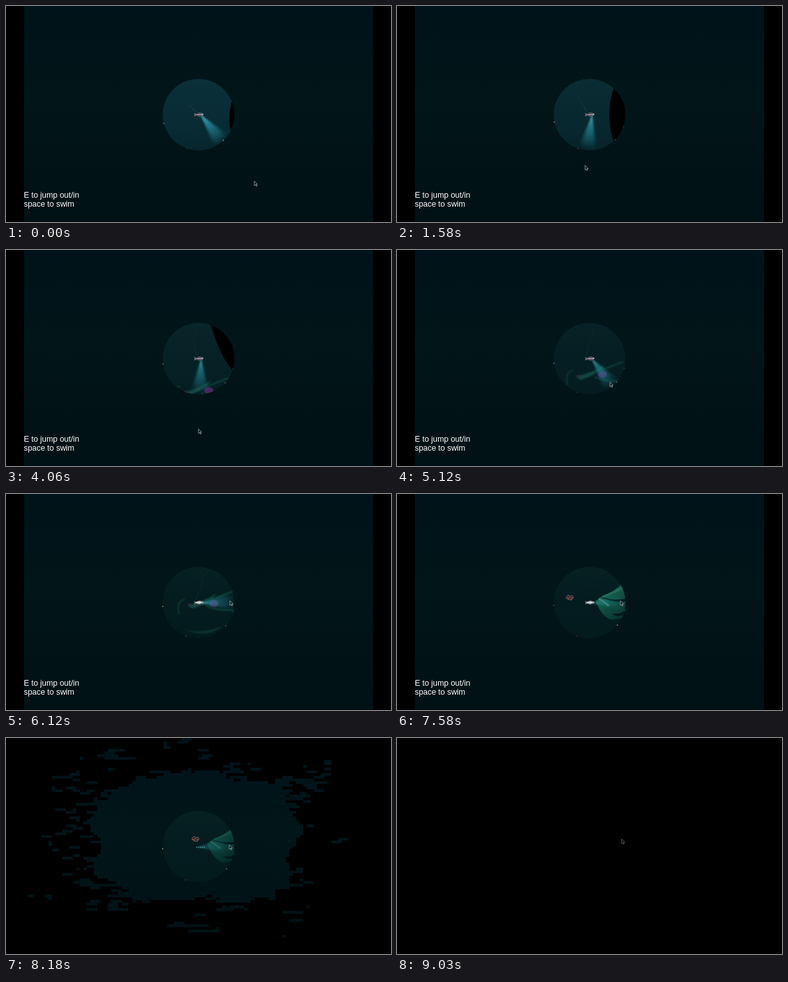
Write an HTML page that moves like this. It is 600 px wide and 338 px high and loops after 9060 ms.

```html
<!DOCTYPE html>
<html lang="en">
<head>
<meta charset="utf-8">
<title>Deep dive</title>
<style>
  html, body { margin: 0; width: 100%; height: 100%; overflow: hidden; background: #000; }
  svg { display: block; width: 100vw; height: 100vh; }
  text { font: 12.45px "Liberation Sans", Arial, sans-serif; fill: #fff; }
</style>
</head>
<body>
<svg viewBox="0 0 600 338">
  <defs>
    <linearGradient id="sea" x2="0" y2="1">
      <stop stop-color="#00131a"/>
      <stop offset=".45" stop-color="#021518"/>
      <stop offset="1" stop-color="#001115"/>
    </linearGradient>
    <linearGradient id="depth" x2="0" y2="1">
      <stop stop-color="#2a6a60" stop-opacity=".07"/>
      <stop offset=".5" stop-color="#06282a" stop-opacity=".05"/>
      <stop offset="1" stop-color="#021518" stop-opacity=".3"/>
    </linearGradient>
    <radialGradient id="light" gradientUnits="userSpaceOnUse" cx="0" cy="0" r="54">
      <stop stop-color="#5fd0dc"/>
      <stop offset=".3" stop-color="#2b9cac" stop-opacity=".85"/>
      <stop offset=".7" stop-color="#217f8d" stop-opacity=".5"/>
      <stop offset="1" stop-color="#1a6873" stop-opacity="0"/>
    </radialGradient>
    <linearGradient id="skin" x2=".7" y2="1">
      <stop stop-color="#1b6b5c"/>
      <stop offset=".5" stop-color="#125546"/>
      <stop offset="1" stop-color="#07332d"/>
    </linearGradient>
    <filter id="soft" x="-20%" y="-50%" width="140%" height="200%"><feGaussianBlur stdDeviation="1"/></filter>
    <clipPath id="lens"><circle cx="300" cy="170" r="56"/></clipPath>
  </defs>

  <rect width="600" height="338"/>
  <rect x="28" width="544" height="338" fill="url(#sea)"/>

  <g clip-path="url(#lens)">
    <circle id="water" cx="300" cy="170" r="56"/>
    <circle cx="300" cy="170" r="56" fill="url(#depth)"/>
    <circle id="wall"/>
    <g id="seabed">
      <g filter="url(#soft)">
        <path d="M274 223Q302 217 320 204Q310 220 282 228Z" fill="#17584d" opacity=".7"/>
        <path d="M262 237Q256 217 271 213" fill="none" stroke="#0a302c" stroke-width="3"/>
        <path d="M264 258Q292 270 330 255Q304 278 264 258" fill="#0a302c"/>
        <path d="M304 217Q328 208 348 200M304 224Q324 232 348 230" fill="none" stroke="#0d3a34" stroke-width="3"/>
      </g>
      <ellipse cx="316" cy="220" rx="7" ry="5.5" fill="#562a6c" opacity=".85"/>
      <ellipse cx="279" cy="222" rx="4" ry="2" fill="#35233e" opacity=".7"/>
    </g>
    <g id="beast">
      <path d="M309 168L319 160Q338 153 350 141L360 146V190Q350 195 334 197Q323 193 316 181Z" fill="url(#skin)"/>
      <path d="M320 161Q339 155 353 145" fill="none" stroke="#2e7d68" stroke-width="3" opacity=".6"/>
      <path d="M317 161Q338 167 358 164V168Q336 171 317 161M335 187Q345 189 354 183L353 189Q342 194 335 187" fill="#021719"/>
      <path d="M315 164Q326 171 330 175" fill="none" stroke="#9ad8cb" stroke-width="3" stroke-dasharray="1 1" opacity=".65"/>
    </g>
    <g id="beam" filter="url(#soft)" fill="url(#light)">
      <path d="M0-.5L53-16Q58 0 53 16L0 .5Z" opacity=".55"/>
      <path d="M0-.5L54-10Q57 0 54 10L0 .5Z" opacity=".6"/>
    </g>
    <g id="bubbles" fill="#3c7480"></g>
    <g id="sub">
      <path d="M293 167l3 2q4-3 9-1.500l3 2-3 2.500q-5 1.500-9-.5l-3 1.500 1-3z" fill="#77747f"/>
      <path d="M297 168.500h7M296 171.500h8" stroke="#312f3d" stroke-width=".8"/>
      <path d="M298 170h6" stroke="#c2aeb5" stroke-width=".8"/>
      <circle cx="306.500" cy="169.500" r="1" fill="#c9dde6"/>
      <path id="glint" d="M295 169l7-1.500 4 2-4 2.500-6-1z" fill="#e4f0f1"/>
    </g>
    <path id="wreck" d="M296 171h14" stroke="#5fa3ad" stroke-width="1.500" stroke-dasharray="2 1"/>
    <g id="hunter" fill="none" stroke-width=".9">
      <path d="M-5.500-1L-2-4 1-2 4-3 6 0 3 4-2 3-4 2Z" fill="#2c2526" stroke="#756a6a"/>
      <path d="M-5 0l3 1 2-2 2 2 3-1M-2 3l1-2M3 3l-1-2" stroke="#985656"/>
    </g>
  </g>
  <g id="markers"></g>

  <text x="27.700" y="300">E to jump out/in</text>
  <text x="27.700" y="314">space to swim</text>

  <path id="dissolve"/>
  <path id="cursor" d="M0 0V7L1.700 5.500 2.900 8.100 4 7.600 2.900 5.100H5Z" fill="#0a0f12" stroke="#b9c0c3" stroke-width=".7"/>
</svg>
<script>
const LOOP = 9060;
const LENS = { x: 300, y: 170, r: 56 };
const DISSOLVE = { start: 7600, end: 8600, reach: 2.4 };
const CELL = { cols: 100, rows: 80, w: 5.44, h: 4.225 };

const $ = id => document.getElementById(id);
const set = (id, attrs) => { for (const k in attrs) $(id).setAttribute(k, attrs[k]); };
const shift = (x, y) => `translate(${x} ${y})`;
const ramp = (t, from, to) => Math.max(0, Math.min(1, (t - from) / (to - from)));
const smooth = k => k * k * (3 - 2 * k);
const mix = (a, b, k) => a + (b - a) * k;
const hash = (a, b) => {
  const s = Math.sin(a * 127.1 + b * 311.7) * 43758.5453;
  return s - Math.floor(s);
};

function circles(parent, count, r) {
  return Array.from({ length: count }, () => {
    const el = document.createElementNS("http://www.w3.org/2000/svg", "circle");
    el.setAttribute("r", r);
    return $(parent).appendChild(el);
  });
}
const bubbles = circles("bubbles", 22, .5);
const markers = circles("markers", 4, .9);
const markerLooks = [[166, "#a9c48a"], [46, "#d8b0a0"], [22, "#244f78"], [108, "#8c2f48"]];

// Stops of the pointer: time, x, y.
const stops = [
  [0, 387, 274], [950, 405, 242], [1500, 293, 249], [2700, 300, 280],
  [4100, 300, 280], [5800, 349, 167], [8200, 348, 167], [LOOP, 350, 158]
];
function pointer(t) {
  const next = stops.findIndex(stop => stop[0] > t);
  const [t0, x0, y0] = stops[next - 1], [t1, x1, y1] = stops[next];
  const k = smooth(ramp(t, t0, t1));
  return [mix(x0, x1, k), mix(y0, y1, k)];
}

function drawBubbles(t) {
  const dx = mix(-24, 20, ramp(t, 2500, 6100)), dy = mix(-20, -52, ramp(t, 0, 4000));
  const visible = 1 - ramp(t, 6000, 7000);
  bubbles.forEach((el, i) => {
    const age = (t / 1700 + i / bubbles.length) % 1;
    el.setAttribute("cx", 296 + (dx + hash(i, 4) * 14 - 7) * age);
    el.setAttribute("cy", 165 + dy * age);
    el.setAttribute("opacity", (.6 - .4 * age) * visible);
  });
}

// Markers slide round the rim towards the horizontal as the dive goes on.
function drawMarkers(t) {
  markers.forEach((el, i) => {
    const [bearing, color] = markerLooks[i];
    const start = bearing * Math.PI / 180;
    const angle = start - .19 * Math.cos(start) * t / 8180;
    el.setAttribute("cx", LENS.x + LENS.r * Math.cos(angle));
    el.setAttribute("cy", LENS.y + LENS.r * Math.sin(angle));
    el.setAttribute("fill", color);
    el.setAttribute("opacity", .7 + .25 * Math.sin(t / 180 + i * 2));
  });
}

// Black cells close in from the edges and leave wide, clustered islands behind.
function isBlack(i, j, radius) {
  const x = Math.abs(28 + (i + .5) * CELL.w - 294) / 153;
  const y = Math.abs((j + .5) * CELL.h - 155) / 96;
  const dist = Math.hypot(x ** 1.5, y ** 1.5) ** (1 / 1.5);
  const piece = hash(Math.floor(i / 3 + hash(j, 9)), j);
  const cluster = hash(i >> 3, (j >> 2) + 40);
  const island = Math.max(0, (piece + cluster) / 2 - .62) * 2;
  const ragged = .06 * Math.sin(i / 5 + j / 3) + .05 * hash(i >> 1, j >> 1);
  return dist > radius * (1 + island + ragged);
}

function dissolvePath(t) {
  const { start, end, reach } = DISSOLVE;
  if (t < start) return "";
  if (t >= end) return "M0 0H600V338H0Z";
  const radius = reach * (1 - ramp(t, start, end));
  let d = "";
  for (let j = 0; j < CELL.rows; j++) {
    for (let i = 0; i < CELL.cols; i++) {
      const first = i;
      while (i < CELL.cols && isBlack(i, j, radius)) i++;
      const width = (i - first) * CELL.w;
      if (width) d += `M${28 + first * CELL.w} ${j * CELL.h}h${width}v${CELL.h + .1}h${-width}z`;
    }
  }
  return d;
}

function draw(t) {
  const [px, py] = pointer(t);
  const depth = t / 4060;
  const dark = ramp(t, 0, 6000);
  const dead = ramp(t, 8000, 8150);
  const arrival = smooth(ramp(t, 6400, 7250));
  const dim = ramp(t, 7580, 8180);
  const angle = Math.atan2(py - 170, px - 304) * 180 / Math.PI;

  set("cursor", { transform: shift(px, py), opacity: 1 - .4 * ramp(t, 8300, 9000) });
  set("water", { fill: `rgb(${mix(9, 4, dark)},${mix(44, 27, dark)},${mix(54, 30, dark)})` });
  set("wall", { cx: 440 + 65 * depth ** 1.2, cy: 176 - 101 * depth ** 3, r: 92 + 98 * depth });
  set("seabed", {
    transform: shift(8 * (depth - 1) * 2, -96 * (depth - 1)),
    opacity: ramp(t, 3200, 4000) * (1 - ramp(t, 6500, 7100))
  });
  set("beast", {
    transform: shift(42 * (1 - arrival) + 4 * dim, 8 * (1 - arrival) - 2 * dim),
    opacity: arrival * (1 - .4 * dim)
  });
  set("beam", {
    transform: shift(304 - 6 * dead, 171) + ` rotate(${angle})`,
    opacity: mix(1, .7, dark) * (1 - .45 * arrival)
  });
  set("sub", { opacity: 1 - dead });
  set("glint", { opacity: .75 * ramp(t, 5200, 6000) });
  set("wreck", { opacity: .7 * dead });
  set("hunter", { transform: shift(mix(269, 295, (t - 7580) / 600), mix(162, 158, (t - 7580) / 600)) });
  set("dissolve", { d: dissolvePath(t) });
  drawBubbles(t);
  drawMarkers(t);
}

const began = performance.now();
function tick() {
  draw((performance.now() - began) % LOOP);
  requestAnimationFrame(tick);
}
tick();
</script>
</body>
</html>
```
